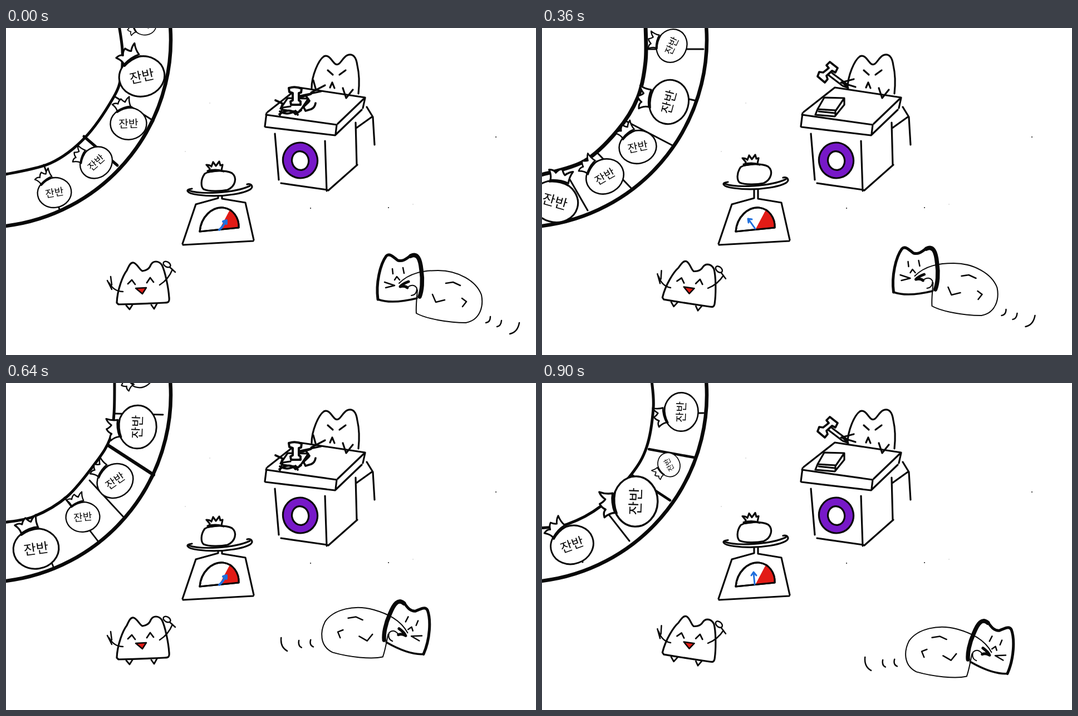
An HTML page for the animation above (1060 ms loop, 952 by 588 pixels).

```html
<!DOCTYPE html>
<html lang="ko">
<head>
<meta charset="utf-8">
<style>
html, body { margin: 0; width: 100%; height: 100%; overflow: hidden; background: #fff; }
svg { display: block; width: 100%; height: 100%; fill: none; stroke: #080808; stroke-width: 3.2; stroke-linecap: round; stroke-linejoin: round; }
text { font: 500 25px "Noto Sans CJK KR", "Noto Sans CJK SC", sans-serif; fill: #080808; stroke: none; text-anchor: middle; }
.white { fill: #fff; }
</style>
</head>
<body>
<svg viewBox="0 0 952 588">
  <defs>
    <g id="bag">
      <ellipse class="white" rx="42" ry="37"/>
      <text y="9">잔반</text>
    </g>
    <path id="knot" class="white" d="M-16-36Q-15-44-22-54Q-13-56-9-51Q-5-58 1-60Q4-53 8-50Q14-57 21-59Q16-48 17-37Q2-41-16-36ZM-17-33Q0-38 18-33"/>
  </defs>

  <g id="wheel"></g>

  <!-- judge and desk -->
  <path d="M549 108C549 86 561 58 571 51C580 46 586 61 592 65C600 69 604 53 613 49C623 45 629 52 631 67C634 80 635 100 633 118"/>
  <path d="M578 76L587 84M610 76L599 84M582 107L586 98L590 108M605 108L611 126L623 111"/>
  <path d="M470 151L526 107L645 125L596 172M467 156L594 174L592 191M468 153L465 177M466 178L591 193L639 147M645 126L641 144"/>
  <path d="M483 190L490 273M494 279L577 291M573 203L576 293M628 170L630 247M579 292L631 246M629 180L657 160M648 142L659 160L662 210"/>
  <g transform="rotate(-12 528.500 238)">
    <ellipse cx="528.500" cy="238" rx="31" ry="32" fill="#7718c8"/>
    <ellipse class="white" cx="528.500" cy="238.500" rx="15" ry="17"/>
  </g>
  <g id="gavelUp">
    <path class="white" d="M495 146L507 125L543 126L528 148ZM495 146L491 156L526 159L543 138V127M527 149V158M497 150L526 153"/>
    <path class="white" d="M515 85L540 104L548 107L549 102L521 81"/>
    <path class="white" stroke-width="3.700" d="M511 67L517 61L531 72L527 80L521 77L511 86L513 92L508 98L495 87L498 79L505 80L515 72Z"/>
    <path d="M560 92L537 98L563 106M540 98L550 108"/>
  </g>
  <g id="gavelDown">
    <path class="white" d="M493 145L506 126L543 127L529 148M492 157L497 143L511 141M527 149L544 133"/>
    <path stroke-width="3.700" d="M484 130L497 136L494 144M491 155Q510 142 520 155L530 148M492 150Q505 158 520 149L524 156M534 141L538 149L548 146Q555 143 556 135M540 124L545 131L537 137M497 147L523 151"/>
    <path stroke-width="4" class="white" d="M508 108Q519 104 531 109L530 116L526 117V130L529 132V138H512L511 132L515 130V117L509 115Z"/>
    <path d="M528 122L566 114M529 125L548 119M548 116L573 103M552 94L557 112"/>
  </g>

  <!-- scale -->
  <path d="M381 290V306L341 317L317 388M388 290V307L430 314L445 381M318 390L444 383"/>
  <path class="white" d="M348 366C350 340 370 321 390 323C408 325 419 342 418 359Z"/>
  <path fill="#e21b16" stroke="none" d="M402 327Q417 336 418 359L383 363Z"/>
  <path d="M348 366C350 340 370 321 390 323C408 325 419 342 418 359Z"/>
  <path id="needle" stroke="#1f6fdd"/>
  <g id="tray">
    <path class="white" d="M334 289C322 290 322 297 345 300C390 306 440 296 442 286C442 281 437 280 433 281"/>
    <path d="M328 292C350 300 410 297 438 284"/>
    <path class="white" d="M357 262C349 273 350 286 355 290C364 294 385 294 398 291C412 285 416 269 406 261C394 255 366 256 357 262Z"/>
    <path class="white" d="M364 259L366 253L360 246Q366 246 369 249L372 241L377 248L383 240L385 247L389 246L387 256ZM362 257Q378 253 391 258"/>
  </g>

  <!-- hungry cat, drawn around its middle -->
  <g id="eater">
    <path d="M-46 34C-45 10-35-15-28-24C-24-33-21-39-16-38C-9-36-5-25 0-23C8-24 13-28 15-34C19-42 29-42 35-34C41-22 47 8 48 25C49 33 46 34 40 34Q0 36-43 37Z"/>
    <path stroke-width="2.800" d="M-26 0L-19-7L-13 1M8-2L14-11L20-3M-29 39L-23 46L-18 38M16 38L21 45L26 36"/>
    <path fill="#e21b16" stroke-width="2.500" d="M-12 8L7 7L0 18Z"/>
    <path stroke-width="2.500" d="M-60-2Q-51 14-35 14M-63-6L-55 10M-57-13L-55 2M31 2Q47-8 54-26M49-30L59-21"/>
    <ellipse cx="44" cy="-35" rx="7" ry="4.500" transform="rotate(30 44 -35)" stroke-width="2.500"/>
  </g>

  <!-- sack carrier, drawn around its head -->
  <g id="carrier" stroke-width="2.500">
    <path stroke-width="5" d="M-40 38C-44 9-36-25-25-40C-19-46-12-38-4-32C4-30 9-33 19-41"/>
    <path stroke-width="7.500" d="M19-40C31-46 36-35 38-15C41 5 39 23 35 33"/>
    <path stroke-width="3.500" d="M-40 38Q-15 47 30 36"/>
    <path d="M-14-17L-13-8M5-19L7-9M-10 3L-6-3L-1 3M-28 7L-10 13L-26 17"/>
    <path stroke-width="5" d="M15 6Q4 10 0 15Q8 13 13 17"/>
    <path stroke-width="2" d="M-2 9C17-10 42-14 68-14C104-14 137 5 146 30C150 50 144 75 118 80C87 80 47 73 29 63C28 50 30 35 31 21M12 17Q24 8 30 18Q30 30 20 31"/>
    <path d="M82 9L95 7L108 13M58 29L64 43L80 39M111 36L119 42L112 51M162 69Q162 79 154 80M182 76Q181 86 174 87M214 80Q211 97 197 100"/>
  </g>

  <path stroke-width="1.800" d="M547 324h.1M687 323h.1M880 196h.1"/>
  <path stroke="#bbb" stroke-width="1.500" d="M731 317h.1M366 135h.1M322 222h.1"/>
</svg>
<script>
const $ = id => document.getElementById(id);
const stroke = (d, width) => `<path d="${d}" stroke-width="${width}"/>`;

// Smooth open curve through "x,y x,y ..." points
function curve(list) {
  const p = list.split(' ').map(s => s.split(',').map(Number));
  const at = i => p[Math.max(0, Math.min(p.length - 1, i))];
  let d = 'M' + p[0];
  for (let i = 0; i < p.length - 1; i++) {
    const handle = (k, sign) => at(k).map((v, j) => v + sign * (at(k + 1)[j] - at(k - 1)[j]) / 6);
    d += `C${handle(i, 1)} ${handle(i + 1, -1)} ${at(i + 1)}`;
  }
  return d;
}

function bag(x, y, r, textAngle, knotAngle) {
  const place = angle => `transform="translate(${x} ${y}) scale(${r / 40}) rotate(${angle})"`;
  return `<use href="#bag" ${place(textAngle)}/><use href="#knot" ${place(knotAngle)}/>`;
}

const rim = stroke('M292-30A337 337 0 0 1-10 357', 6.5);
const wheel = (inner, width, spokes, ...bags) =>
  rim + stroke(curve(inner), width) + spokes + bags.join('');

const wheels = [
  wheel('203,-5 209,40 207,85 193,125 142,197 80,243 -5,264', 5,
    stroke('M195 123L265 167M68 246L96 326', 3) + stroke('M140 195L200 247', 5),
    bag(248, -7, 21, 15, -110), bag(244, 87, 39, -12, -32), bag(220, 172, 31, -2, -18),
    bag(162, 242, 29, -42, -66), bag(87, 296, 29, -10, -34)),
  wheel('184,-5 194,40 190,100 158,180 100,236 45,264 -5,269', 6,
    stroke('M195 51L290 42M190 116L270 131', 3) + stroke('M158 178L229 215M40 266L50 344', 4),
    bag(236, -6, 28, -75, -95), bag(242, 68, 32, -88, -108), bag(223, 170, 39, -25, -43),
    bag(178, 226, 22, -8, -40), bag(102, 280, 38, 18, 18), bag(21, 315, 30, 30, 30)),
  wheel('186,-5 186,60 172,125 135,185 75,240 -5,265', 7,
    stroke('M188 38H290M220 118L278 131M150 167L236 212M100 225L162 290M44 262L82 328', 3),
    bag(233, 32, 29, -65, -74), bag(228, 133, 38, -75, -80), bag(172, 214, 32, -12, -36),
    bag(113, 267, 33, -30, -56), bag(23, 312, 40, 16, 12)),
  wheel('195,-5 194,55 187,100 162,142 110,204 50,240 -5,251', 5,
    stroke('M196 55L282 57M150 175L212 242M105 206L168 288M50 240L86 333', 2.8) + stroke('M185 113L265 165', 6),
    bag(241, -21, 28, -80, -128), bag(236, 79, 37, -88, -95), bag(196, 176, 32, -35, -52),
    bag(138, 241, 29, -6, -22), bag(54, 298, 39, -8, -20)),
  wheel('202,-5 204,50 195,90 178,140 150,180 95,223 45,247 -5,251', 5,
    stroke('M201 48L282 44M185 125L260 133M155 178L217 227M95 224L138 291L150 295', 3.5) + stroke('M43 251L48 348L-5 355', 6.5),
    bag(238, -1, 37, -120, -138), bag(225, 129, 36, -85, -94), bag(185, 210, 29, -35, -58),
    bag(99, 270, 37, -22, -38), bag(5, 301, 29, 3, 5)),
  wheel('197,-5 200,45 188,115 160,165 105,222 45,254 -5,261', 5,
    stroke('M215 55L290 54M107 220L157 284M15 265L73 322', 3) + stroke('M192 119L274 134M160 165L230 211', 4.5),
    bag(250, 52, 33, -88, -102), bag(228, 147, 21, -118, -128), bag(168, 213, 43, -88, -95),
    bag(54, 291, 37, -20, -45))
];

const eaterPoses = ['translate(245 460)', 'translate(221 461) rotate(-15)', 'translate(268 460) rotate(11)'];
const [heavy, middle, light] = [
  { drop: 0, width: 4, needle: 'M383 363Q391 356 394 348M390 348L396 346L396 352Z' },
  { drop: -6.5, width: 3, needle: 'M382 362L380 341M376 346L380 340L385 346' },
  { drop: -12, width: 3, needle: 'M383 361L371 344M371 350L370 343L377 344' }
];
const weights = [heavy, middle, light, heavy, light, middle];
const leftward = (x, y) => `translate(${x} ${y})`;
const rightward = (x, y) => `translate(${x} ${y}) rotate(16) scale(-1 1)`;
const carrierPoses = [
  leftward(708, 450), leftward(689, 442), leftward(671.5, 437),
  rightward(722, 440), rightward(765, 461), rightward(808, 475)
];
const starts = [0, 200, 360, 530, 710, 900], loop = 1060;
let shown = -1;

function show(i) {
  const { drop, width, needle } = weights[i];
  $('wheel').innerHTML = wheels[i];
  $('gavelDown').style.display = i % 3 ? 'none' : '';
  $('gavelUp').style.display = i % 3 ? '' : 'none';
  $('tray').setAttribute('transform', `translate(0 ${drop})`);
  $('needle').setAttribute('d', needle);
  $('needle').setAttribute('stroke-width', width);
  $('eater').setAttribute('transform', eaterPoses[i % 3]);
  $('carrier').setAttribute('transform', carrierPoses[i]);
}

function tick() {
  const time = performance.now() % loop;
  const i = starts.findLastIndex(start => time >= start);
  if (i !== shown) show(shown = i);
  requestAnimationFrame(tick);
}
tick();
</script>
</body>
</html>
```
